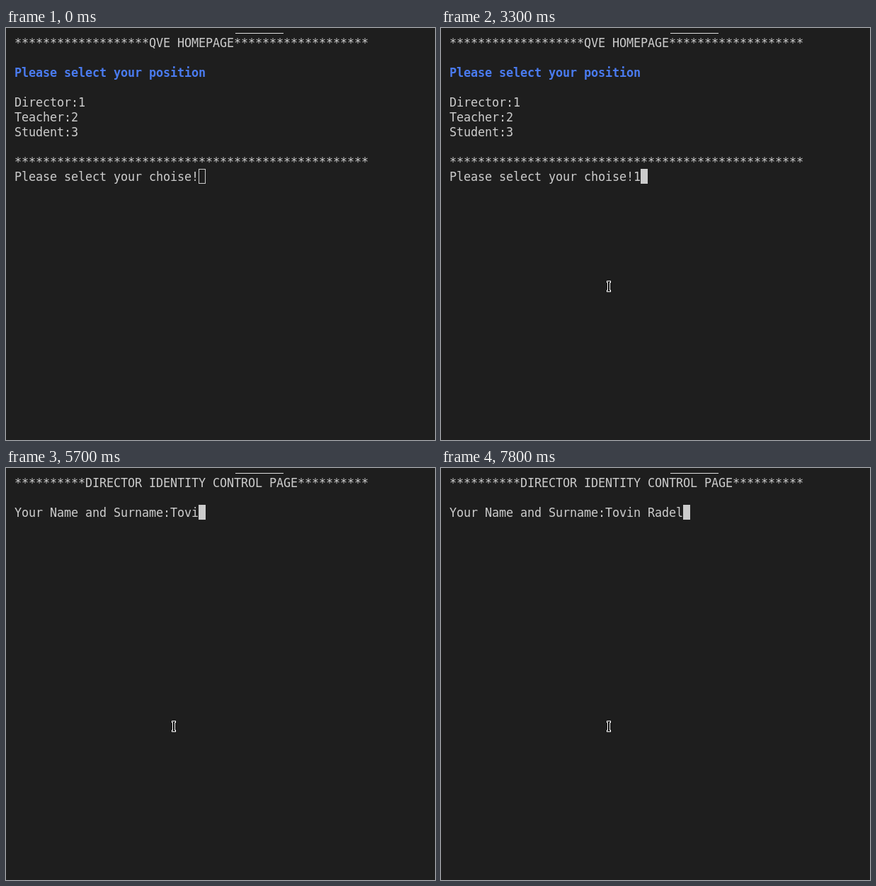
Recreate the animation shown at these times as an HTML page with a canvas. Size 606x582 px, loop 8000 ms.

```html
<!DOCTYPE html>
<html lang="en">
<head>
<meta charset="utf-8">
<title>Terminal menu</title>
<style>
html, body { margin: 0; width: 100%; height: 100%; overflow: hidden; background: #1e1e1e; }
canvas { display: block; }
</style>
</head>
<body>
<canvas id="stage" width="606" height="582"></canvas>
<script>
const ctx = document.getElementById('stage').getContext('2d');
const LOOP = 8000, TICK = 100;
const LEFT = 12, TOP = 10, CELL_W = 10, CELL_H = 21, BASELINE = 17;
const BG = '#1e1e1e', FG = '#cccccc', BLUE = '#4a7bef';
const FONT = '16.8px "DejaVu Sans Mono", monospace';

const FOCUS_AT = 1100, CHOICE_AT = 3300, PAGE_AT = 3600;
const NAME = 'Tovin Radel';
const KEY_TIMES = [4800, 5100, 5200, 5700, 6000, 6300, 6900, 7400, 7500, 7700, 7800];

const stars = n => '*'.repeat(n);
const MENU = [
  stars(19) + 'QVE HOMEPAGE' + stars(19),
  '',
  '',
  '',
  'Director:1',
  'Teacher:2',
  'Student:3',
  '',
  stars(50)
];
const HEADING = 'Please select your position';
const PROMPT = 'Please select your choise!';
const ID_TITLE = stars(10) + 'DIRECTOR IDENTITY CONTROL PAGE' + stars(10);
const ID_PROMPT = 'Your Name and Surname:';

function rect(color, x, y, w, h) {
  ctx.fillStyle = color;
  ctx.fillRect(x, y, w, h);
}

// Every glyph sits on the terminal's whole-pixel grid.
function write(text, row, color = FG, weight = '') {
  ctx.font = weight + ' ' + FONT;
  ctx.fillStyle = color;
  [...text].forEach((ch, col) => {
    if (ch !== ' ') ctx.fillText(ch, LEFT + col * CELL_W, TOP + row * CELL_H + BASELINE);
  });
}

function caret(col, row, filled) {
  const x = LEFT + col * CELL_W, y = TOP + row * CELL_H;
  rect(FG, x, y, CELL_W, CELL_H);
  if (!filled) rect(BG, x + 1, y + 1, CELL_W - 2, CELL_H - 2);
}

function promptLine(text, row, filled) {
  write(text, row);
  caret(text.length, row, filled);
}

function curve(a, b, c, d, u) {
  const v = 1 - u;
  return [0, 1].map(i => Math.round(
    v * v * v * a[i] + 3 * v * v * u * b[i] + 3 * v * u * u * c[i] + u * u * u * d[i]));
}

function pointerAt(t) {
  if (t < 100) return null;
  if (t < 900) return curve([74, 391], [130, 350], [265, 255], [294, 217], (t - 100) / 700);
  if (t < 1300) return [292, 210];
  const u = Math.min(1, (t - 1200) / 700);
  return curve([292, 210], [375, 245], [310, 345], [237, 365], u);
}

function pointer([x, y]) {
  const white = '#ffffff', core = '#000000';
  rect(white, x - 3, y - 8, 6, 3);
  rect(white, x - 3, y + 5, 6, 3);
  rect(white, x - 2, y - 6, 4, 12);
  rect(core, x - 2, y - 7, 4, 1);
  rect(core, x - 2, y + 6, 4, 1);
  rect(core, x - 1, y - 7, 2, 14);
}

function menuPage(t) {
  MENU.forEach((line, row) => write(line, row));
  write(HEADING, 2, BLUE, 'bold');
  promptLine(PROMPT + (t >= CHOICE_AT ? '1' : ''), 9, t >= FOCUS_AT);
}

function identityPage(t) {
  const typed = KEY_TIMES.filter(k => k <= t).length;
  write(ID_TITLE, 0);
  promptLine(ID_PROMPT + NAME.slice(0, typed), 2, true);
}

function draw(t) {
  rect(BG, 0, 0, 606, 582);
  rect('#dddddd', 324, 7, 68, 1);
  (t < PAGE_AT ? menuPage : identityPage)(t);
  const pos = pointerAt(t);
  if (pos) pointer(pos);
}

function loop() {
  const t = (performance.now() - start) % LOOP;
  draw(Math.floor(t / TICK) * TICK);
  requestAnimationFrame(loop);
}

const start = performance.now();
loop();
</script>
</body>
</html>
```
